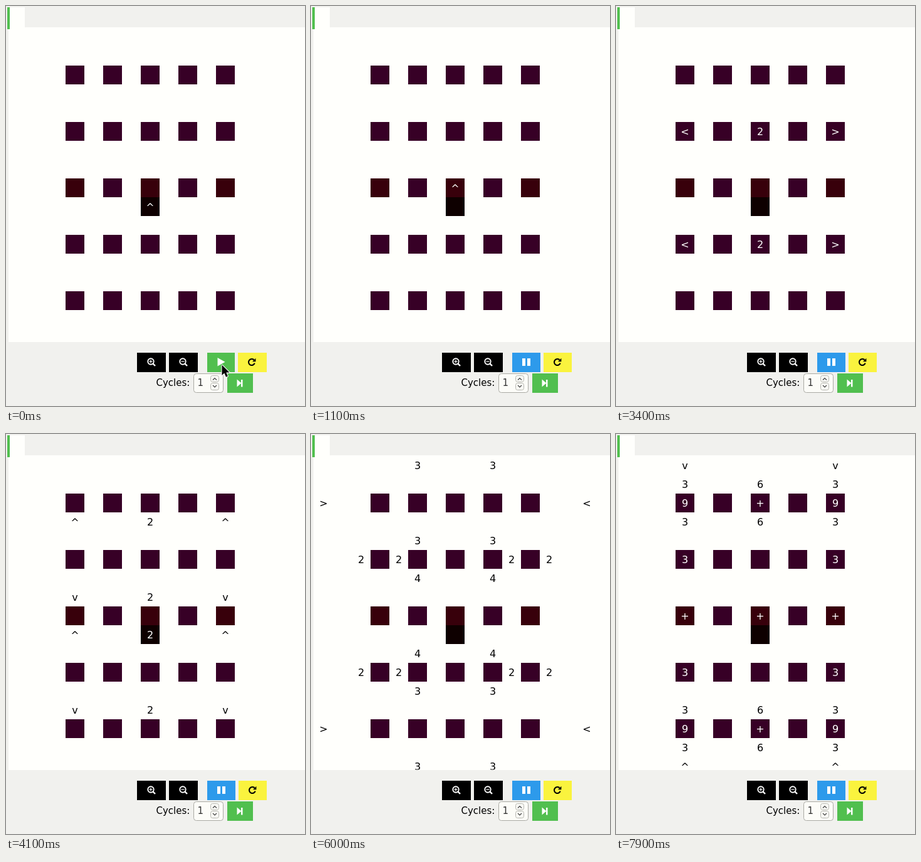
These frames come from a looping animation (477 by 638 pixels, 8 s). An HTML page with a canvas:

```html
<!DOCTYPE html>
<html lang="en">
<head>
<meta charset="utf-8">
<title>Signal grid</title>
<style>
html, body { margin: 0; width: 100%; height: 100%; overflow: hidden; background: #f1f1ee; }
canvas { display: block; width: 477px; height: 638px; }
</style>
</head>
<body>
<canvas id="stage" width="477" height="638"></canvas>
<script>
const ctx = document.getElementById('stage').getContext('2d');
const LOOP = 8000, CELL = 30, CX = 230, CY = 290, MAX_X = 7, MAX_Y = 8;
const PAPER = '#fffffc', GREEN = '#51bf4f', BLUE = '#2d9aeb', YELLOW = '#faf33e';
const COLS = [-4, -2, 0, 2, 4], ROWS = [-6, -3, 0, 3, 6];
const PRESS = 300, RUN = 500, CLEAR = 600;
// When each simulation step becomes visible.
const STEPS = [0, 1100, 1500, 1700, 2100, 2400, 2700, 3100, 3400, 3800, 4100,
  4500, 4800, 5500, 5600, 6000, 6200, 6600, 6900, 7300, 7600, 7900];

const isSplitter = (x, y) => COLS.includes(x) && ROWS.includes(y);
const isRed = (x, y) => y === 0 && x % 4 === 0;

function exits(s) {
  // Red cells have a fixed axis; the others split at right angles.
  const horizontal = isRed(s.x, s.y) ? s.x === 0 : s.dy !== 0;
  return horizontal ? [[-1, 0], [1, 0]] : [[0, -1], [0, 1]];
}

function advance(signals) {
  const merged = new Map();
  const add = (x, y, dx, dy, n) => {
    const key = [x, y, dx, dy].join();
    const found = merged.get(key);
    if (found) found.n += n;
    else merged.set(key, { x, y, dx, dy, n });
  };
  for (const s of signals) {
    if (isSplitter(s.x, s.y)) {
      for (const [dx, dy] of exits(s)) add(s.x + dx, s.y + dy, dx, dy, s.n);
    } else {
      const x = s.x + s.dx, y = s.y + s.dy;
      if (Math.abs(x) > MAX_X || Math.abs(y) > MAX_Y) add(s.x, s.y, -s.dx || 0, -s.dy || 0, s.n);
      else add(x, y, s.dx, s.dy, s.n);
    }
  }
  return [...merged.values()];
}

const states = [[{ x: 0, y: 1, dx: 0, dy: -1, n: 1 }]];
while (states.length < STEPS.length) states.push(advance(states[states.length - 1]));

function rect(color, x, y, w, h) {
  ctx.fillStyle = color;
  ctx.fillRect(x, y, w, h);
}

function poly(color, points) {
  ctx.beginPath();
  points.forEach(([x, y]) => ctx.lineTo(x, y));
  ctx.closePath();
  ctx.fillStyle = color;
  ctx.fill();
}

function line(color, width, points) {
  ctx.beginPath();
  points.forEach(([x, y]) => ctx.lineTo(x, y));
  ctx.strokeStyle = color;
  ctx.lineWidth = width;
  ctx.stroke();
}

function text(str, x, y, size, color, align) {
  ctx.font = size + 'px "DejaVu Sans", sans-serif';
  ctx.textAlign = align;
  ctx.fillStyle = color;
  ctx.fillText(str, x, y);
}

function square(x, y, color) {
  rect(color, CX + x * CELL - 15, CY + y * CELL - 15, CELL, CELL);
}

function glyph(s, total) {
  if (total > 9) return '+';
  if (total > 1) return String(total);
  return s.dx ? (s.dx < 0 ? '<' : '>') : (s.dy < 0 ? '^' : 'v');
}

function drawGrid(signals) {
  ctx.save();
  ctx.beginPath();
  ctx.rect(4, 34, 473, 501.5);
  ctx.clip();
  square(0, 1, '#0e0000');
  for (const y of ROWS) for (const x of COLS) square(x, y, isRed(x, y) ? '#38000b' : '#370026');

  const cells = new Map();
  for (const s of signals) {
    const key = s.x + ',' + s.y;
    const cell = cells.get(key) || { s, total: 0 };
    cell.total += s.n;
    cells.set(key, cell);
  }
  for (const { s, total } of cells.values()) {
    const dark = isSplitter(s.x, s.y) || (s.x === 0 && s.y === 1);
    text(glyph(s, total), CX + s.x * CELL, CY + s.y * CELL + 6, 16, dark ? '#fff' : '#000', 'center');
  }
  ctx.restore();
}

function drawZoom(x, plus) {
  rect('#000', x, 553, 46, 31);
  const cx = x + 22, cy = 567;
  ctx.beginPath();
  ctx.arc(cx, cy, 4.7, 0, 7);
  ctx.strokeStyle = '#fff';
  ctx.lineWidth = 1.9;
  ctx.stroke();
  line('#fff', 2.4, [[cx + 3.5, cy + 3.5], [cx + 7, cy + 7]]);
  line('#fff', 1.2, [[cx - 2.5, cy], [cx + 2.5, cy]]);
  if (plus) line('#fff', 1.2, [[cx, cy - 2.5], [cx, cy + 2.5]]);
}

function drawReload(x) {
  rect(YELLOW, x, 553, 416 - x, 31);
  const cx = x + 22, cy = 568;
  ctx.beginPath();
  ctx.arc(cx, cy, 5, 0.35, 5.5);
  ctx.strokeStyle = '#000';
  ctx.lineWidth = 2.1;
  ctx.stroke();
  poly('#000', [[cx + 6.4, cy - 6.2], [cx + 6.4, cy - 0.8], [cx + 1, cy - 0.8]]);
}

function drawRunButton(t) {
  if (t < RUN) {
    rect(t < PRESS ? GREEN : '#4ab548', 321, 553, 44, 31);
    poly('#fff', [[337.5, 561], [349.5, 567.8], [337.5, 574.6]]);
  } else {
    rect(BLUE, 321, 553, 45, 31);
    rect('#fff', 337, 562, 5, 12);
    rect('#fff', 345, 562, 5, 12);
  }
}

function roundBox(x, y, w, h, r, fill, stroke) {
  ctx.beginPath();
  ctx.roundRect(x, y, w, h, r);
  ctx.fillStyle = fill;
  ctx.fill();
  ctx.strokeStyle = stroke;
  ctx.lineWidth = 1;
  ctx.stroke();
}

function drawCycles() {
  text('Cycles:', 239.5, 606, 15, '#000', 'left');
  roundBox(299.5, 586.5, 47, 30, 4, '#fcfcf8', '#aaaaa4');
  text('1', 305.5, 606, 15, '#333', 'left');
  roundBox(326.5, 589.5, 13, 10, 3, '#f8f8f4', '#b8b8b2');
  roundBox(326.5, 601.5, 13, 11, 3, '#f8f8f4', '#b8b8b2');
  line('#444', 1.2, [[330, 596.5], [333, 593.5], [336, 596.5]]);
  line('#444', 1.2, [[330, 605], [333, 608], [336, 605]]);

  rect(GREEN, 353, 586, 41, 31);
  poly('#fff', [[368.5, 595.5], [375.5, 601.5], [368.5, 607.5]]);
  rect('#fff', 375, 596, 2.5, 11.5);
}

function drawCursor(x, y) {
  const shape = [[0, 0], [0, 16.5], [3.8, 13], [6.5, 19.3], [9.4, 18], [6.8, 12], [12, 12]]
    .map(([px, py]) => [x + px, y + py]);
  ctx.lineJoin = 'round';
  line('#fff', 2, [...shape, shape[0]]);
  poly('#000', shape);
  ctx.lineJoin = 'miter';
}

function draw(t) {
  rect('#f1f1ee', 0, 0, 477, 638);
  rect(PAPER, 4, 34, 473, 502);
  rect(PAPER, 6, 2, 24, 33);
  rect(GREEN, 2, 2, 4, 35);

  if (t < CLEAR || t >= STEPS[1]) {
    drawGrid(states[STEPS.findLastIndex(at => at <= t)]);
  }
  drawZoom(209, true);
  drawZoom(260, false);
  drawRunButton(t);
  drawReload(t < RUN ? 370 : 371);
  drawCycles();
  if (t < CLEAR) drawCursor(344.5, t < PRESS ? 572.5 : 570.5);
}

const start = performance.now();
function tick() {
  draw((performance.now() - start) % LOOP);
  requestAnimationFrame(tick);
}
tick();
</script>
</body>
</html>
```
